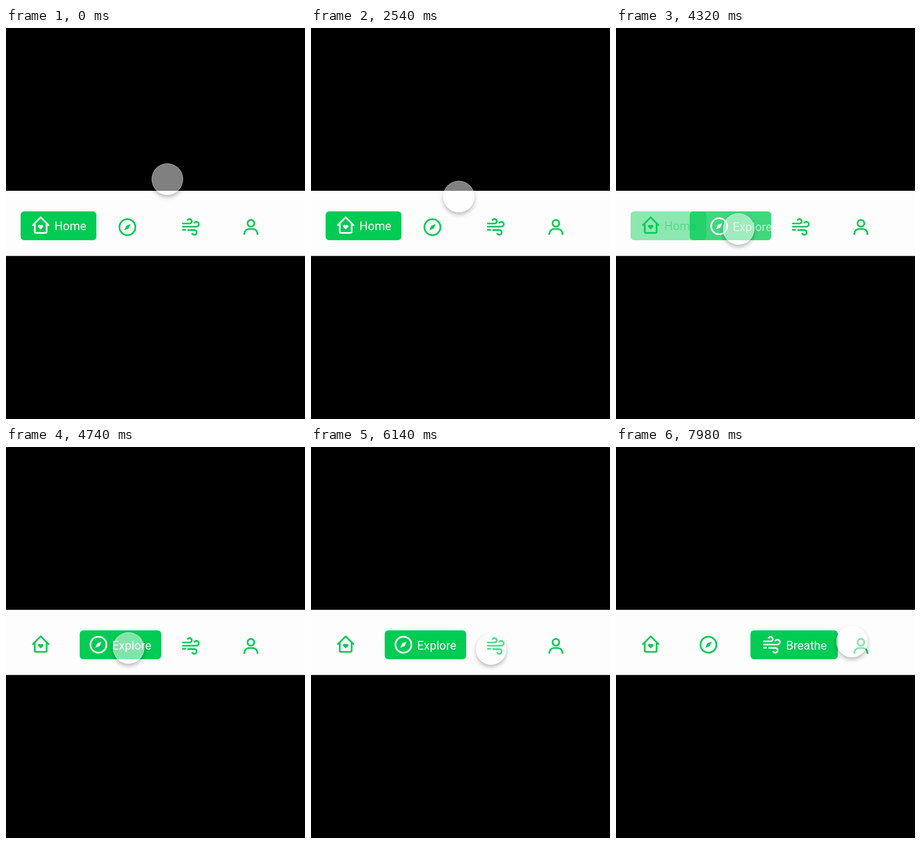
Write an HTML page that moves like this. It is 655 by 855 pixels and loops after 8 s.

```html
<!DOCTYPE html>
<html lang="en">
<head>
<meta charset="utf-8">
<title>Navigation bar</title>
<style>
  html, body { margin: 0; width: 100%; height: 100%; overflow: hidden; background: #000; }
  svg { position: absolute; left: 0; top: 0; }
  text { font: 400 26px Roboto, sans-serif; fill: currentColor; }
  .line { fill: none; stroke: currentColor; stroke-width: 3.7; }
  .solid { fill: currentColor; }
  .pill { fill: #00cb53; }
  #cursor {
    position: absolute; left: -34.5px; top: -34.5px; width: 69px; height: 69px;
    box-sizing: border-box; border-radius: 50%;
    border: 1px solid rgba(255, 255, 255, .4);
    box-shadow: 0 5px 10px rgba(0, 0, 0, .27);
  }
</style>
</head>
<body>
<svg width="655" height="855" viewBox="0 0 655 855" color="#00cb53">
  <rect y="356" width="655" height="142.5" fill="#fdfdfd"/>
  <rect id="homePill" class="pill" x="32" y="401" width="166" height="63" rx="8"/>
  <rect id="pill" class="pill" y="401" height="63" rx="8"/>

  <g id="home">
    <g transform="translate(76 431)">
      <path class="line" stroke-linecap="round" stroke-linejoin="round"
        d="M-17 0L0-17L17 0M-13-2V14.5Q-13 17-10.5 17H10.5Q13 17 13 14.5V-2"/>
      <path class="solid" d="M0 9.5L-5 4.6C-8 1-3-2.5 0 .8C3-2.5 8 1 5 4.6Z"/>
    </g>
    <text x="106" y="442">Home</text>
  </g>

  <g id="explore">
    <circle class="line" r="17.5"/>
    <path class="solid" d="M7-7L2.7 2.9L-7 7L-2.7-2.9Z"/>
    <text x="30" y="11">Explore</text>
  </g>

  <g id="breathe">
    <path class="line" d="M-19-7.5H-3a4.9 4.9 0 1 0-4.6-6.5M-19-.5H12a5.3 5.3 0 1 0-5-7
      M-19 6.3H-11M-7.5 6.8H7.5a5.2 5.2 0 1 1-5 6.7"/>
    <text x="31" y="10.5">Breathe</text>
  </g>

  <g class="line">
    <circle cx="536.5" cy="427" r="7.4"/>
    <path d="M522 452.3C522 443.5 527 439.5 533 439.5H540C546 439.5 551 443.5 551 452.3"/>
  </g>
</svg>
<div id="cursor"></div>

<script>
const LOOP = 8000;
const SELECT_EXPLORE = 4185, SELECT_BREATHE = 6712, SWITCH = 300;
const $ = id => document.getElementById(id);
const clamp = v => Math.min(1, Math.max(0, v));
const mix = (a, b, p) => a + (b - a) * p;
const span = (t, start, end) => clamp((t - start) / (end - start));
const easeInOut = p => (1 - Math.cos(Math.PI * p)) / 2;
const easeOut = p => 1 - (1 - p) ** 1.65;

// start, end, x, y
const moves = [
  [2380, 2780, 268, 439],
  [4780, 5300, 394, 442],
  [7620, 8100, 537, 422]
];
const presses = [[3540, 4180], [6080, 6700]];

function cursorAt(t) {
  let x = 353, y = 330;
  for (const [start, end, toX, toY] of moves) {
    const p = easeInOut(span(t, start, end));
    x = mix(x, toX, p);
    y = mix(y, toY, p);
  }
  const press = Math.max(...presses.map(([down, up]) =>
    span(t, down, down + 90) * (1 - span(t, up - 90, up))));
  return { x, y, press };
}

function setItem(id, x, y, selected, labelOpacity) {
  const item = $(id);
  item.setAttribute('color', selected ? '#fff' : '#00cb53');
  if (x !== null) item.setAttribute('transform', `translate(${x} ${y})`);
  item.querySelector('text').setAttribute('opacity', labelOpacity);
}

function draw(t) {
  const toExplore = easeOut(span(t, SELECT_EXPLORE, SELECT_EXPLORE + SWITCH));
  const toBreathe = easeOut(span(t, SELECT_BREATHE, SELECT_BREATHE + SWITCH));

  $('homePill').setAttribute('opacity', (1 - toExplore) ** .82);
  const left = mix(161.5, 294.5, toBreathe), right = mix(340, 486, toBreathe);
  const pill = $('pill');
  pill.setAttribute('x', left);
  pill.setAttribute('width', right - left);
  pill.setAttribute('opacity', toExplore ** .62);

  setItem('home', null, null, toExplore === 0, 1 - toExplore);
  setItem('explore', mix(266, 202.5, toExplore), mix(435.5, 432.3, toExplore),
    toExplore > 0 && toBreathe === 0, toExplore * (1 - toBreathe));
  setItem('breathe', mix(405, 341.5, toBreathe), mix(435, 432.5, toBreathe),
    toBreathe > 0, toBreathe);

  const { x, y, press } = cursorAt(t);
  const cursor = $('cursor');
  cursor.style.transform = `translate(${x}px, ${y}px) scale(${1 - .045 * press})`;
  cursor.style.background = `rgba(255, 255, 255, ${mix(.5, .22, press)})`;
}

function tick() {
  draw(performance.now() % LOOP);
  requestAnimationFrame(tick);
}
tick();
</script>
</body>
</html>
```
